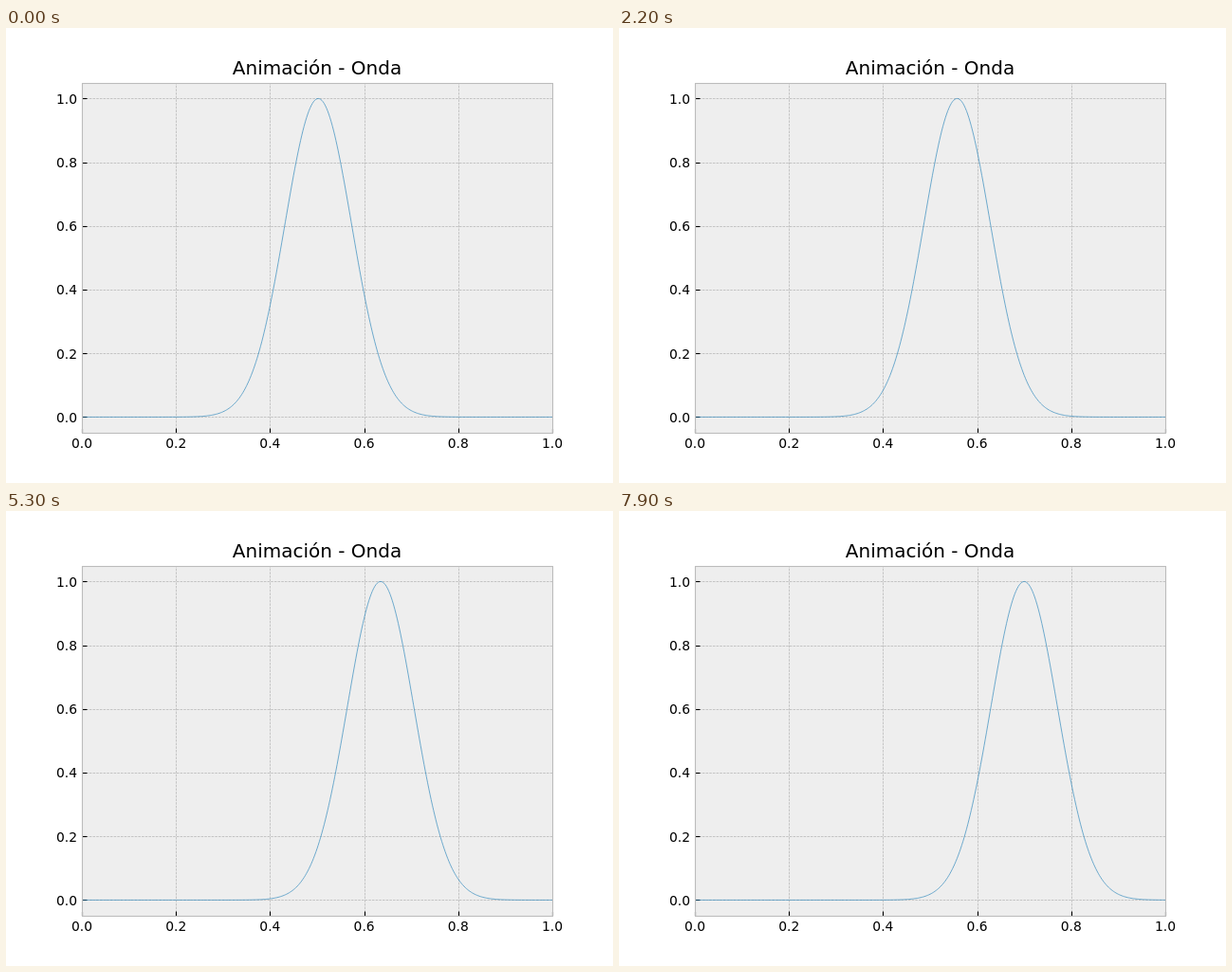
Recreate the animation shown at these times as an HTML page with a canvas. Size 640 by 480 pixels, loop 8 s.

```html
<!DOCTYPE html>
<html lang="es">
<head>
<meta charset="utf-8">
<title>Animación - Onda</title>
<style>
  html, body { margin: 0; width: 100%; height: 100%; overflow: hidden; background: #fff; }
  canvas { display: block; }
</style>
</head>
<body>
<canvas id="plot" width="640" height="480"></canvas>
<script>
const ctx = document.getElementById('plot').getContext('2d');
const LEFT = 80, RIGHT = 576, TOP = 57.6, BOTTOM = 427.2;
const STEP_MS = 100, STEPS = 80;
const THIN = 0.694, EDGE = 1.111;
const TICKS = [0, 0.2, 0.4, 0.6, 0.8, 1];

const px = x => LEFT + x * (RIGHT - LEFT);
const py = y => 410.4 - y * 336;
const snap = v => Math.floor(v + 0.5) + 0.5;

function line(x1, y1, x2, y2) {
  ctx.beginPath();
  ctx.moveTo(x1, y1);
  ctx.lineTo(x2, y2);
  ctx.stroke();
}

function pen(color, width, dash = []) {
  ctx.strokeStyle = color;
  ctx.lineWidth = width;
  ctx.setLineDash(dash);
}

function text(str, x, y, size, align) {
  ctx.font = `${size}px "DejaVu Sans", sans-serif`;
  ctx.textAlign = align;
  ctx.fillText(str, x, y);
}

function drawAxes() {
  const l = snap(LEFT), r = snap(RIGHT), t = snap(TOP), b = snap(BOTTOM);
  ctx.fillStyle = '#fff';
  ctx.fillRect(0, 0, 640, 480);
  ctx.fillStyle = '#eee';
  ctx.fillRect(l, t, r - l, b - t);

  pen('#b2b2b2', THIN, [2.57, 1.11]);
  for (const v of TICKS) {
    line(snap(px(v)), b, snap(px(v)), t);
    line(l, snap(py(v)), r, snap(py(v)));
  }

  pen('#000', EDGE);
  ctx.fillStyle = '#000';
  for (const v of TICKS) {
    const x = snap(px(v)), y = snap(py(v)), label = v.toFixed(1);
    line(x, b, x, b - 5);
    line(l, y, l + 5, y);
    text(label, px(v), 443, 13.889, 'center');
    text(label, 75.1, Math.round(py(v) + 5.4), 13.889, 'right');
  }
  text('Animación - Onda', 328, 49, 20, 'center');
}

function drawWave(center) {
  ctx.save();
  ctx.beginPath();
  ctx.rect(LEFT, TOP, RIGHT - LEFT, BOTTOM - TOP);
  ctx.clip();
  pen('#348abd', THIN);
  ctx.lineJoin = 'round';
  ctx.beginPath();
  for (let i = 0; i <= 400; i++) {
    const x = i / 400;
    ctx.lineTo(px(x), py(Math.exp(-100 * (x - center) ** 2)));
  }
  ctx.stroke();
  ctx.restore();
}

function drawFrame() {
  const step = Math.floor(performance.now() / STEP_MS) % STEPS;
  drawAxes();
  drawWave(0.5025 + 0.0025 * step);
  pen('#bcbcbc', EDGE);
  ctx.strokeRect(snap(LEFT), snap(TOP), snap(RIGHT) - snap(LEFT), snap(BOTTOM) - snap(TOP));
  requestAnimationFrame(drawFrame);
}

drawFrame();
</script>
</body>
</html>
```
